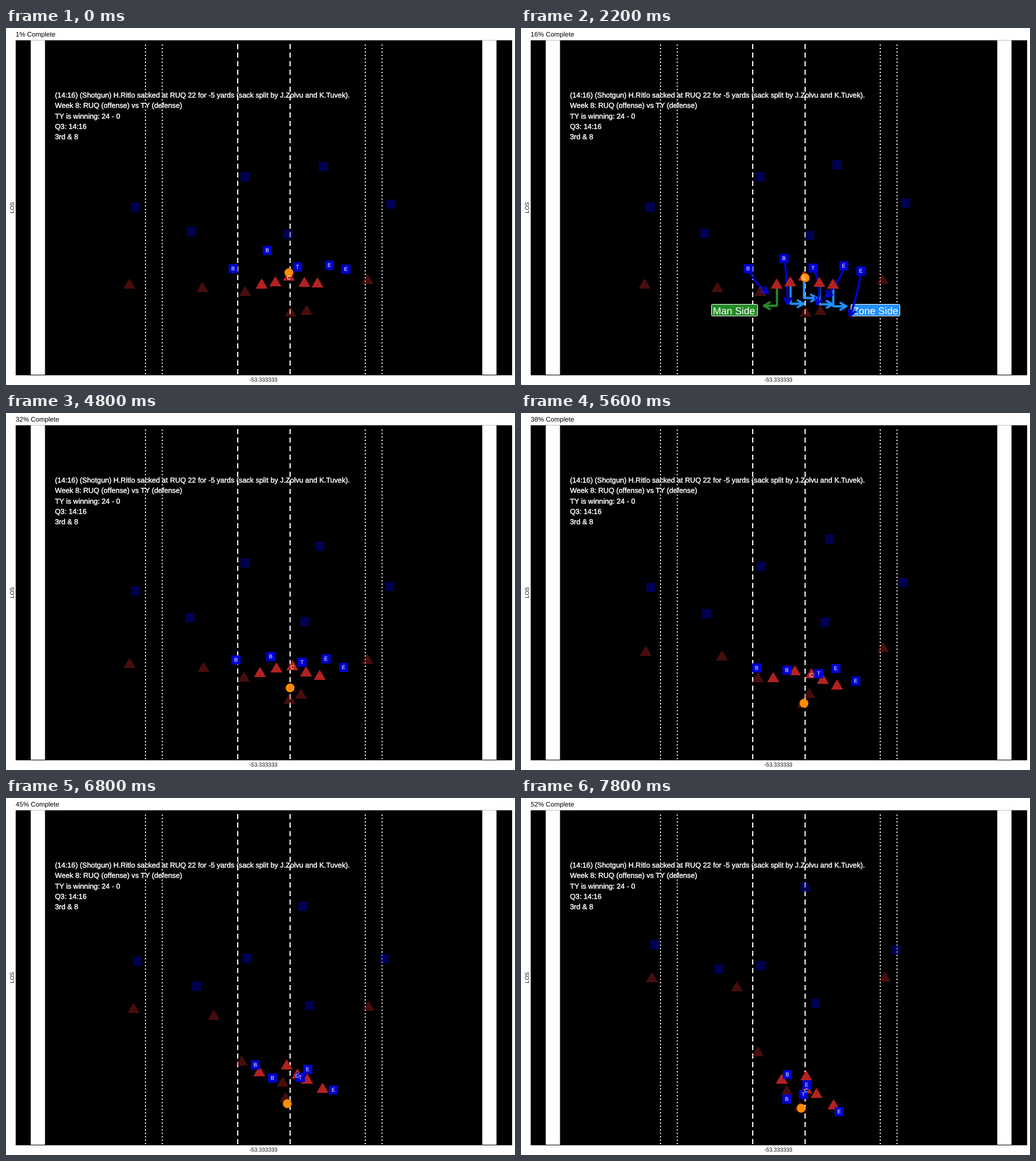
An HTML page that plays this animation: 894 px wide and 626 px high, repeating every 8000 ms.

```html
<!DOCTYPE html>
<html lang="en">
<head>
<meta charset="utf-8">
<title>Play tracking</title>
<style>
  html, body { margin: 0; width: 100%; height: 100%; overflow: hidden; background: #fff; }
  svg { display: block; width: 894px; height: 626px; }
  text { font-family: "Liberation Sans", Arial, sans-serif; text-rendering: geometricPrecision; }
  .axis { font-size: 9.8px; text-anchor: middle; fill: #111; }
  .info { font-size: 12.67px; fill: #fff; stroke: #fff; stroke-width: .45px; }
  .side { font-size: 17.5px; fill: #fff; text-anchor: middle; }
  #letters { font-size: 9.5px; fill: #fff; text-anchor: middle; }
  #offense, #defense { shape-rendering: crispEdges; }
  .dash { stroke-dasharray: 9 6; }
  .dots { stroke-dasharray: 2 4; }
  .faint { opacity: .4; }
  #schemes path { fill: none; stroke-width: 3.8; stroke-linejoin: round; stroke-linecap: round; }
  .man { stroke: #228b22; }
  .zone { stroke: #1e90ff; }
  .rush { stroke: #0000cd; }
</style>
</head>
<body>
<svg viewBox="0 0 894 626">
  <text id="progress" x="17" y="15" font-size="11.66"></text>
  <path d="M17 21.5H889V609H17Z"/>
  <path fill="#fff" d="M43.5 21.5h25V608h-25ZM836.5 21.5h25V608h-25Z"/>
  <g stroke="#fff" stroke-width="2">
    <path class="dash" d="M407 607V28M499 607V28"/>
    <path class="dots" d="M245 607V27M274.5 607V27M631 607V27M660.5 607V27"/>
  </g>
  <text class="axis" x="452" y="620">-53.333333</text>
  <text class="axis" transform="translate(13.5 315) rotate(-90)">LOS</text>
  <g class="info">
    <text x="86" y="122">(14:16) (Shotgun) H.Ritlo sacked at RUQ 22 for -5 yards (sack split by J.Zolvu and K.Tuvek).</text>
    <text x="86" y="140">Week 8: RUQ (offense) vs TY (defense)</text>
    <text x="86" y="158.5">TY is winning: 24 - 0</text>
    <text x="86" y="176.5">Q3: 14:16</text>
    <text x="86" y="195">3rd &amp; 8</text>
  </g>
  <g id="schemes">
    <g stroke="#fff">
      <rect x="334.5" y="484.5" width="81" height="20.5" rx="2" fill="#228b22"/>
      <rect x="579.5" y="484.5" width="86" height="20.5" rx="2" fill="#1e90ff"/>
    </g>
    <text class="side" x="374" y="501.5">Man Side</text>
    <text class="side" x="622.5" y="501.5">Zone Side</text>
  </g>
  <g id="offense" fill="#b22222"></g>
  <g id="defense" fill="#0000cd"></g>
  <g id="football" fill="#ff8c00"></g>
  <g id="letters"></g>
</svg>
<script>
const LOOP = 8000, STEP = 200, TOTAL = 77;
const SNAP = 6, PAUSE = 12;          // the play freezes at the snap for some steps
const BREAK = 8, END = 27;           // ticks between which the routes are run
const ARROW_END = 21;
const SHAPES = {
  offense: 'M0-10L10.5 8H-10.5Z',
  defense: 'M-8-8H8V8H-8Z',
  football: 'M-7.8 0A7.8 7.8 0 1 1 7.8 0A7.8 7.8 0 1 1-7.8 0Z'
};
const $ = id => document.getElementById(id);
const units = [];

function add(parent, tag, attrs) {
  const el = document.createElementNS('http://www.w3.org/2000/svg', tag);
  for (const name in attrs) el.setAttribute(name, attrs[name]);
  return parent.appendChild(el);
}

// A unit drifts into `spot`, then covers `run` with an eased start, bowed sideways by `bend`
function unit(team, spot, run, options) {
  const u = { spot, run, ease: 1, bend: [0, 0], drift: [0, 0], getOff: 1, ...options };
  u.shape = add($(team), 'path', { d: SHAPES[team], class: u.faint ? 'faint' : '' });
  if (u.letter) {
    u.label = add($('letters'), 'text', { y: team === 'offense' ? 6 : 3.4 });
    u.label.textContent = u.letter;
  }
  units.push(u);
  return u;
}

function position(u, tick) {
  const toGo = 1 - Math.min(tick / BREAK, 1) ** u.getOff;
  const done = Math.max(0, (tick - BREAK) / (END - BREAK)) ** u.ease;
  const bow = 4 * done * (1 - done);
  return u.spot.map((s, i) => s - u.drift[i] * toGo + u.run[i] * done + u.bend[i] * bow);
}

const receiver = (spot, run, o) => unit('offense', spot, run, { faint: true, ease: 1.7, ...o });
const blocker = (spot, run, o) => unit('offense', spot, run, { ease: 1.4, ...o });
const cover = (spot, run, o) => unit('defense', spot, run, { faint: true, ease: 1.7, ...o });
const rusher = (letter, spot, run, o) => unit('defense', spot, run, { letter, ease: 1.2, ...o });

receiver([217, 449], [13, -134]);
receiver([345.5, 455], [34, -124]);
receiver([420, 462.5], [-3.5, -17], { bend: [-4, 9] });
receiver([635.5, 441], [4, -127]);
receiver([500.5, 498], [-10, 43], { bend: [-3, 0], ease: 1.5 });
receiver([526, 495.5], [-58.5, 17.5], { bend: [0, -10], ease: 1.3, drift: [-2, 0] });

const line = [
  blocker([449.5, 449], [8.5, 44.5], { bend: [-10, 3] }),
  blocker([473.5, 445.5], [27.5, 42], { bend: [5, 0], ease: 2 }),
  blocker([497, 435.5], [4.5, 75], { bend: [14, 0], letter: 'C' }),
  blocker([524.5, 446.5], [-5.5, 72], { bend: [9, 0] }),
  blocker([548.5, 450], [1, 88], { bend: [8, 2], drift: [1, 3] })
];

cover([227.5, 314], [7.5, -57], { ease: 2.4 });
cover([323, 362], [24, -62], { ease: 2.2, drift: [-3, 4.5] });
cover([420, 261.5], [1.5, 33], { bend: [3, 0] });
cover([555, 240], [-56, -82.5], { drift: [-2, -3.5] });
cover([676, 307], [-17.5, -41], { drift: [0, -2] });
cover([511, 365.5], [6.5, -5.5], { bend: [22.5, 4], ease: 1.1, drift: [16, 3] });

const rush = [
  rusher('B', [399.5, 422.5], [68.5, 62.5], { bend: [-10, 3] }),
  rusher('B', [463, 409], [4, 119], { bend: [3, 0], drift: [4, 18.5] }),
  rusher('T', [513.5, 422.5], [-17, 97.5], { bend: [18, 0], drift: [1.5, 3.5] }),
  rusher('E', [567.5, 418], [-65.5, 85], { bend: [10, 0], drift: [-.5, 2] }),
  rusher('E', [597, 427.5], [-37.5, 122.5], { bend: [5, 0], drift: [0, 4] })
];

unit('football', [501.5, 446.5], [-9.5, 97.5], { bend: [0, 23], drift: [4.5, 17.5], getOff: 2 });

function arrow(kind, points) {
  const [[x0, y0], [x, y]] = points.slice(-2);
  const angle = Math.atan2(y - y0, x - x0);
  const barb = turn => [x - 12 * Math.cos(angle + turn), y - 12 * Math.sin(angle + turn)];
  const d = `M${points.join('L')}M${barb(.52)}L${x},${y}L${barb(-.52)}`;
  add($('schemes'), 'path', { class: kind, d });
}

line.forEach(({ spot: [x, y] }, i) => {
  const depth = y + 38, reach = i ? 23 : -23;
  arrow(i ? 'zone' : 'man', [[x, y + 3], [x, depth], [x + reach, depth]]);
});
for (const u of rush) {
  const points = [];
  for (let tick = SNAP; tick <= ARROW_END; tick++) points.push(position(u, tick));
  arrow('rush', points);
}

function draw(now) {
  const step = Math.floor(now % LOOP / STEP);
  const tick = step <= SNAP ? step : Math.max(SNAP, step - PAUSE);
  $('progress').textContent = `${Math.round((step + 1) / TOTAL * 100)}% Complete`;
  $('schemes').style.display = tick === SNAP ? '' : 'none';
  for (const u of units) {
    const place = `translate(${position(u, tick).map(Math.floor)})`;
    u.shape.setAttribute('transform', place);
    if (u.label) u.label.setAttribute('transform', place);
  }
  requestAnimationFrame(draw);
}
draw(performance.now());
</script>
</body>
</html>
```
